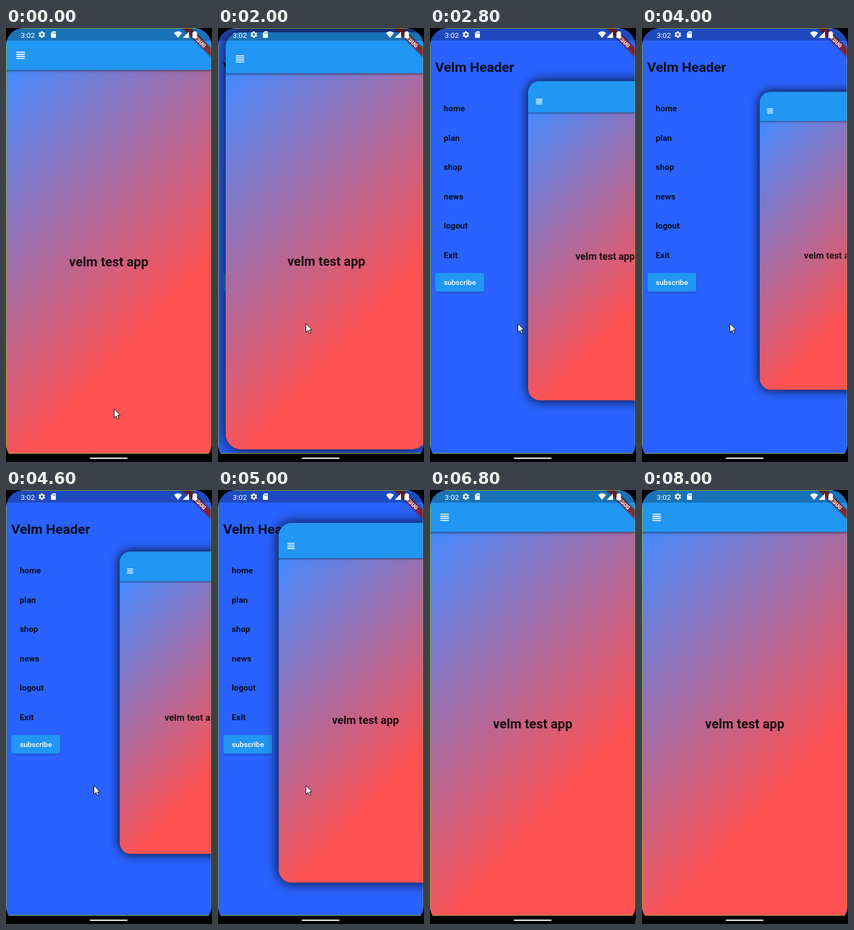
Recreate the animation shown at these times as an HTML page. Size 376x792 px, loop 8.4 s.

```html
<!DOCTYPE html>
<html lang="en">
<head>
<meta charset="utf-8">
<title>Drawer demo</title>
<style>
  html, body { margin: 0; width: 100%; height: 100%; overflow: hidden; background: #000; }
  svg { display: block; width: 376px; height: 792px; font-family: Roboto, "Noto Sans", sans-serif; }
  .ink { fill: #000; fill-opacity: .87; font-weight: 700; }
</style>
</head>
<body>
<svg viewBox="0 0 376 792">
  <defs>
    <linearGradient id="body" gradientUnits="userSpaceOnUse" x1="0" y1="76.4" x2="375" y2="426.4">
      <stop stop-color="#448aff"/><stop offset="1" stop-color="#ff5252"/>
    </linearGradient>
    <linearGradient id="barShade" x2="0" y2="1">
      <stop stop-opacity=".42"/><stop offset=".5" stop-opacity=".16"/><stop offset="1" stop-opacity="0"/>
    </linearGradient>
    <filter id="blur" filterUnits="userSpaceOnUse" x="-60" y="-60" width="496" height="900">
      <feGaussianBlur stdDeviation="14.4"/>
    </filter>
    <filter id="soft" x="-20%" y="-40%" width="140%" height="200%"><feGaussianBlur stdDeviation="1.6"/></filter>
    <clipPath id="screen"><rect width="375" height="792" rx="33"/></clipPath>
    <clipPath id="app"><rect width="375" height="777"/></clipPath>
    <clipPath id="cardClip"><rect id="cardShape" width="375" height="776.5"/></clipPath>
  </defs>
  <rect width="376" height="792"/>
  <g clip-path="url(#screen)">
    <g clip-path="url(#app)">
      <rect width="375" height="777" fill="#2962ff"/>
      <g class="ink">
        <text x="9.5" y="80" font-size="24.8">Velm Header</text>
        <g id="menu" font-size="15.3"></g>
      </g>
      <rect x="10" y="448.500" width="89" height="34" rx="4" fill-opacity=".35" filter="url(#soft)"/>
      <rect x="9.700" y="447" width="89.300" height="34.300" rx="4" fill="#2196f3"/>
      <text x="54.500" y="469" font-size="13.4" font-weight="500" fill="#fff" text-anchor="middle">subscribe</text>

      <g id="card">
        <rect id="shadow" width="375" height="776.5" rx="28.6" fill-opacity=".95" filter="url(#blur)"/>
        <g clip-path="url(#cardClip)">
          <rect width="375" height="777" fill="url(#body)"/>
          <rect width="375" height="76.4" fill="#2196f3"/>
          <rect y="76.4" width="375" height="5.5" fill="url(#barShade)"/>
          <path id="bars" fill="#fff"/>
          <text class="ink" x="187.5" y="434.7" font-size="23.9" text-anchor="middle">velm test app</text>
        </g>
      </g>

      <g transform="translate(375.4 0) rotate(45)">
        <rect x="-38.2" y="26.7" width="76.4" height="11.5" fill-opacity=".5" filter="url(#soft)"/>
        <rect x="-38.2" y="26.7" width="76.4" height="11.5" fill="#b71c1c" fill-opacity=".63"/>
        <text y="36" font-size="9.7" font-weight="900" fill="#fff" text-anchor="middle">DEBUG</text>
      </g>
    </g>

    <rect width="375" height="23" fill-opacity=".25"/>
    <rect x=".5" y=".5" width="374" height="775.7" fill="none" stroke="#95b314" stroke-width="1.2" stroke-opacity=".85"/>
    <g fill="#fff">
      <text x="26.7" y="17.5" font-size="13.6">3:02</text>
      <path transform="translate(58 4.6) scale(.62)" fill-rule="evenodd" d="M19.1 12.9a7 7 0 0 0 0-1.9l2-1.6c.2-.1.2-.4.1-.6l-1.9-3.3c-.1-.2-.4-.3-.6-.2l-2.4 1a7 7 0 0 0-1.6-1l-.4-2.5a.5.5 0 0 0-.5-.4h-3.8a.5.5 0 0 0-.5.4l-.4 2.5a7 7 0 0 0-1.6 1l-2.4-1c-.2-.1-.5 0-.6.2L2.7 8.8c-.1.2-.1.5.1.6l2 1.6a7 7 0 0 0 0 1.9l-2 1.6c-.2.1-.2.4-.1.6l1.9 3.3c.1.2.4.3.6.2l2.4-1a7 7 0 0 0 1.6 1l.4 2.5c0 .2.2.4.5.4h3.8c.3 0 .5-.2.5-.4l.4-2.5a7 7 0 0 0 1.6-1l2.4 1c.2.1.5 0 .6-.2l1.9-3.3c.1-.2.1-.5-.1-.6zM12 15.5a3.500 3.500 0 1 1 0-7a3.500 3.500 0 0 1 0 7z"/>
      <path fill-rule="evenodd" d="M85.3 6h4.700q1 0 1 1v10q0 1-1 1h-7q-1 0-1-1v-7.700zM85 8v2.500h1V8zm2 0v2.500h1V8zm2 0v2.500h1V8z"/>
      <path d="M314 18L306.700 9Q314 3 321.300 9z"/>
      <path d="M322.500 18H334V6.500z"/>
      <path d="M340.500 7.500h2V6h4v1.500h2V18.500h-8z"/>
    </g>
  </g>
  <rect y="777" width="376" height="15"/>
  <rect x="153" y="784" width="69" height="2.2" rx="1.1" fill="#fff"/>
  <path id="cursor" d="M.5 .5V16.500L4.200 13L6.900 18.700L9.200 17.700L6.700 12H11.500z" fill="#fff" stroke="#000" stroke-linejoin="round"/>
</svg>
<script>
const LOOP = 8400, STEP = 200;
const SLIDE = 215, SHRINK = 0.3, MIDDLE = 388, RADIUS = 28.6;
const byId = id => document.getElementById(id);
const clamp = v => Math.min(1, Math.max(0, v));
const ease = v => (1 - Math.cos(Math.PI * clamp(v))) / 2;
const progress = (t, start, end) => ease((t - start) / (end - start));

byId('menu').innerHTML = ['home', 'plan', 'shop', 'news', 'logout', 'Exit']
  .map((label, i) => `<text x="25" y="${152.2 + i * 53.55}">${label}</text>`).join('');
byId('bars').setAttribute('d',
  [0, 1, 2, 3].map(i => `M18.9 ${43.2 + i * 3.82}h15.6v1.91h-15.6z`).join(''));

// Pointer stops: time, x, y
const pointerPath = [
  [0, 197, 695], [1000, 22, 48], [1500, 22, 48],
  [1950, 160, 539], [6300, 160, 539], [6900, 390, 800], [LOOP, 390, 800]
];

function pointerAt(t) {
  const i = pointerPath.findIndex(stop => t < stop[0]);
  const [t0, x0, y0] = pointerPath[i - 1], [t1, x1, y1] = pointerPath[i];
  const k = progress(t, t0, t1);
  return [x0 + (x1 - x0) * k, y0 + (y1 - y0) * k];
}

function draw(t) {
  const open = progress(t, 1769, 3178) - progress(t, 4470, 5550);
  const scale = 1 - SHRINK * open;
  byId('card').setAttribute('transform',
    `translate(${SLIDE * open} ${MIDDLE}) scale(${scale}) translate(0 ${-MIDDLE})`);
  const moved = open > 0.0005;
  byId('cardShape').setAttribute('rx', moved ? RADIUS : 0);
  byId('shadow').setAttribute('visibility', moved ? 'visible' : 'hidden');
  byId('cursor').setAttribute('transform', `translate(${pointerAt(t)})`);
}

const began = performance.now();
function tick() {
  const t = (performance.now() - began) % LOOP;
  draw(Math.floor(t / STEP) * STEP);
  requestAnimationFrame(tick);
}
tick();
</script>
</body>
</html>
```
